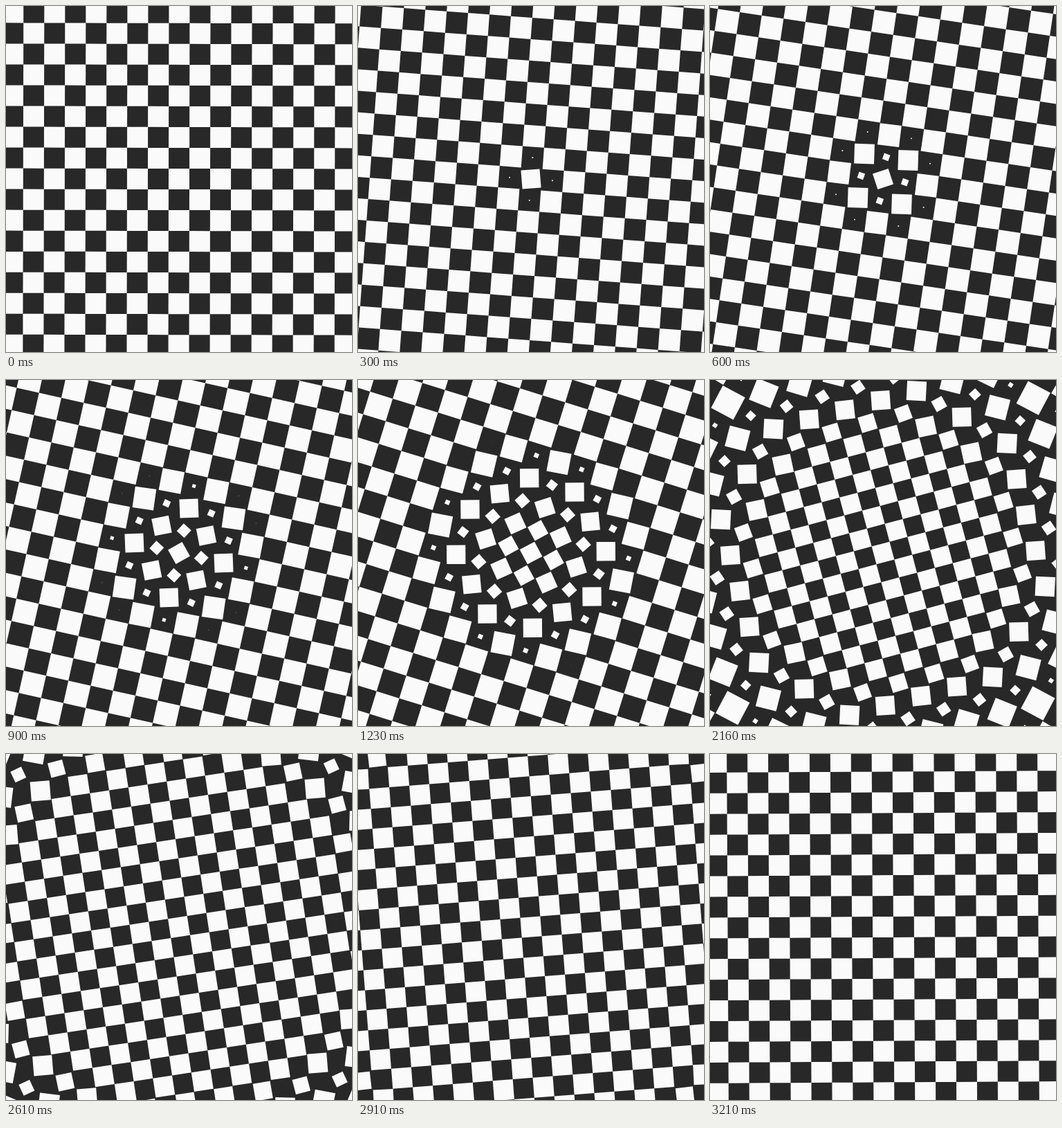
Write an HTML page with a canvas that moves like this. It is 500 by 500 pixels and loops after 3240 ms.

```html
<!DOCTYPE html>
<html lang="en">
<head>
<meta charset="utf-8">
<title>Checkerboard turn</title>
<style>
  html, body { margin: 0; width: 100%; height: 100%; overflow: hidden; background: #282828; }
  canvas { display: block; }
</style>
</head>
<body>
<canvas id="stage" width="500" height="500"></canvas>
<script>
const ctx = document.getElementById("stage").getContext("2d");
const LOOP = 3240, STEP = 30, STEPS = LOOP / STEP;
const CELL = 30, REACH = 12;
const SPEED = 13.2, WIDTH = 4.4; // wave speed and length, in cells
const QUARTER = Math.PI / 4;

const clamp = x => Math.min(1, Math.max(0, x));
const ease = x => x * x * (3 - 2 * x);

function drawCell(i, j, t) {
  const even = (i + j) % 2 === 0;
  const u = clamp((SPEED * t - Math.hypot(i, j)) / WIDTH);
  const turn = QUARTER * ease(u);
  // the turning square always fits inside its own cell
  const side = (even ? 1 : u) / (Math.cos(turn) + Math.sin(turn));
  if (!side) return;
  ctx.save();
  ctx.translate(i, j);
  ctx.rotate(even ? -turn : turn);
  ctx.fillRect(-side / 2, -side / 2, side, side);
  ctx.restore();
}

function draw(t) {
  ctx.fillStyle = "#282828";
  ctx.fillRect(0, 0, 500, 500);
  ctx.fillStyle = "#fafafa";
  ctx.save();
  ctx.translate(250, 250);
  ctx.rotate(QUARTER * t);
  const scale = CELL * 2 ** (t / 2);
  ctx.scale(scale, scale);
  for (let i = -REACH; i <= REACH; i++)
    for (let j = -REACH; j <= REACH; j++) drawCell(i, j, t);
  ctx.restore();
}

const start = performance.now();
function tick() {
  const time = (performance.now() - start) % LOOP;
  draw((Math.floor(time / STEP) + 0.25) / STEPS);
  requestAnimationFrame(tick);
}
tick();
</script>
</body>
</html>
```
